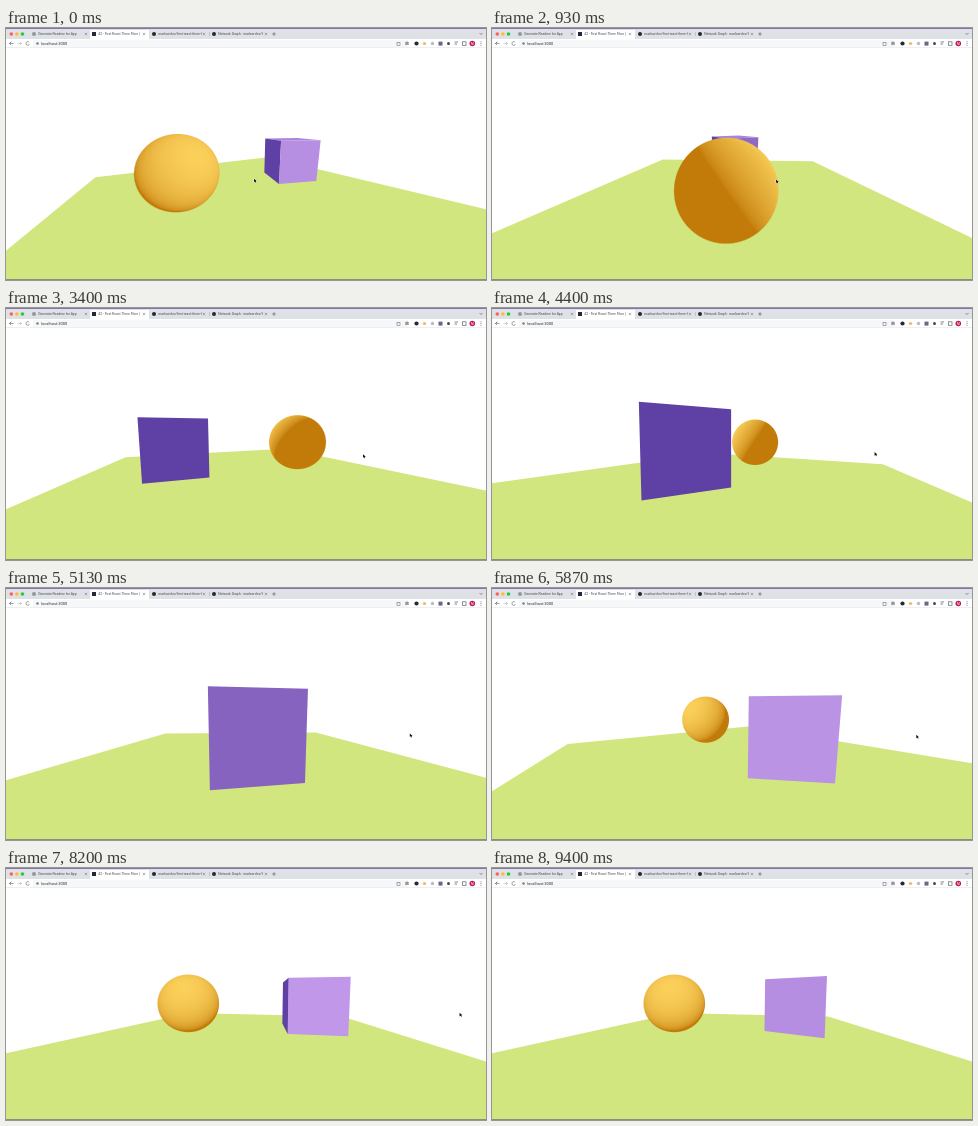
An HTML page with a canvas that plays this animation: 480 px wide and 252 px high, repeating every 9.47 s.

```html
<!DOCTYPE html>
<html lang="en">
<head>
<meta charset="utf-8">
<title>Orbiting scene</title>
<style>
html, body { margin: 0; width: 100%; height: 100%; overflow: hidden; background: #fff; }
canvas { display: block; width: 480px; height: 252px; }
</style>
</head>
<body>
<canvas id="stage" width="480" height="252"></canvas>
<script>
const ctx = document.getElementById('stage').getContext('2d');
const LOOP = 9470, FPS = 15;
const CX = 240, CY = 136, TOP = 20, RAD = Math.PI / 180;
const FOCAL = 116 / Math.tan(37.5 * RAD);
const ORBIT = 5, DEG_PER_PX = 360 / 232;
const LIGHT = [1, 2, 3].map(v => v / Math.sqrt(14));
const BALL = [-2, 0, 0], BOX = [2, 0, 0], HALF = 0.75;
const ORANGE = [[194, 122, 8], [250, 207, 90]];
const PURPLE = [[95, 64, 164], [207, 164, 243]];

// Drag path: seconds, azimuth, elevation
const DRAG = [
  [0, -31, 12.7], [0.933, -87, 14], [2.267, -154, 11], [4.4, -239.8, 2.5],
  [5.867, -304.5, 6.5], [7, -343.5, 3.4], [8.1, -350, 3.5]
];

const dot = (a, b) => a[0] * b[0] + a[1] * b[1] + a[2] * b[2];
const clamp = v => Math.max(0, Math.min(1, v));

function slope(i, c) {
  const rise = j => (DRAG[j + 1][c] - DRAG[j][c]) / (DRAG[j + 1][0] - DRAG[j][0]);
  if (i === 0) return rise(0);
  if (i === DRAG.length - 1) return 0;
  const a = rise(i - 1), b = rise(i);
  return a * b <= 0 ? 0 : 2 * a * b / (a + b);
}

function dragAt(t, c) {
  const last = DRAG.length - 1;
  if (t >= DRAG[last][0]) return DRAG[last][c];
  let i = 0;
  while (t >= DRAG[i + 1][0]) i++;
  const h = DRAG[i + 1][0] - DRAG[i][0], u = (t - DRAG[i][0]) / h, v = 1 - u;
  return DRAG[i][c] * v * v * (1 + 2 * u) + DRAG[i + 1][c] * u * u * (3 - 2 * u)
    + h * u * v * (v * slope(i, c) - u * slope(i + 1, c));
}

function makeCamera(azimuth, elevation) {
  const s = Math.sin(azimuth * RAD), c = Math.cos(azimuth * RAD);
  const se = Math.sin(elevation * RAD), ce = Math.cos(elevation * RAD);
  const back = [ce * s, se, ce * c];
  return { back, right: [c, 0, -s], up: [-se * s, ce, -se * c], eye: back.map(v => v * ORBIT) };
}

const toView = (cam, p) => [dot(cam.right, p), dot(cam.up, p), ORBIT - dot(cam.back, p)];

function shade([dark, lit], amount) {
  const k = Math.pow(Math.max(0, amount), 0.62);
  return dark.map((d, i) => Math.round(d + (lit[i] - d) * k));
}

function clipNear(points, near = 0.1) {
  const out = [];
  points.forEach((a, i) => {
    const b = points[(i + 1) % points.length];
    if (a[2] >= near) out.push(a);
    if ((a[2] >= near) !== (b[2] >= near)) {
      const k = (near - a[2]) / (b[2] - a[2]);
      out.push(a.map((v, j) => v + (b[j] - v) * k));
    }
  });
  return out;
}

function fillFace(cam, points, color) {
  ctx.beginPath();
  for (const [x, y, z] of clipNear(points.map(p => toView(cam, p)))) {
    ctx.lineTo(CX + x / z * FOCAL, CY - y / z * FOCAL);
  }
  ctx.closePath();
  ctx.fillStyle = color;
  ctx.fill();
}

function drawBox(cam, spin) {
  const s = Math.sin(spin), c = Math.cos(spin);
  const place = (x, y, z) => [BOX[0] + x * c + z * s, y, z * c - x * s];
  const face = (normal, corners) => {
    const center = BOX.map((v, i) => v + normal[i] * HALF);
    if (dot(normal, cam.eye) <= dot(normal, center)) return;
    fillFace(cam, corners, `rgb(${shade(PURPLE, dot(normal, LIGHT))})`);
  };
  const ring = [[-HALF, -HALF], [HALF, -HALF], [HALF, HALF], [-HALF, HALF]];
  for (const side of [1, -1]) {
    const d = side * HALF;
    face([0, side, 0], ring.map(([a, b]) => place(a, d, b)));
    face([side * c, 0, -side * s], ring.map(([a, b]) => place(d, a, b)));
    face([side * s, 0, side * c], ring.map(([a, b]) => place(a, b, d)));
  }
}

const ballLayer = document.createElement('canvas');
ballLayer.width = ballLayer.height = 160;
const ballCtx = ballLayer.getContext('2d');

// Ray-traced unit sphere with diffuse light
function drawBall(cam) {
  const size = ballLayer.width, image = ballCtx.createImageData(size, size);
  const [vx, vy, vz] = toView(cam, BALL);
  const left = Math.round(CX + vx / vz * FOCAL - size / 2);
  const top = Math.round(CY - vy / vz * FOCAL - size / 2);
  const toEye = cam.eye.map((v, i) => v - BALL[i]);
  const eyeSq = dot(toEye, toEye);
  for (let y = 0; y < size; y++) {
    for (let x = 0; x < size; x++) {
      const px = (left + x + 0.5 - CX) / FOCAL, py = (CY - top - y - 0.5) / FOCAL;
      const len = Math.hypot(px, py, 1);
      const ray = cam.back.map((b, i) => (cam.right[i] * px + cam.up[i] * py - b) / len);
      const along = dot(ray, toEye), missSq = eyeSq - along * along;
      const cover = clamp((1 - Math.sqrt(missSq)) * FOCAL / vz + 0.5);
      if (!cover) continue;
      const hit = -along - Math.sqrt(Math.max(0, 1 - missSq));
      const normal = toEye.map((v, i) => v + ray[i] * hit);
      image.data.set([...shade(ORANGE, dot(normal, LIGHT)), cover * 255], (y * size + x) * 4);
    }
  }
  ballCtx.putImageData(image, 0, 0);
  ctx.drawImage(ballLayer, left, top);
}

function rect(x, y, w, h, color) {
  ctx.fillStyle = color;
  ctx.fillRect(x, y, w, h);
}

function disc(x, y, r, color) {
  ctx.fillStyle = color;
  ctx.beginPath();
  ctx.arc(x, y, r, 0, 7);
  ctx.fill();
}

function stroke(color, width, ...points) {
  ctx.strokeStyle = color;
  ctx.lineWidth = width;
  ctx.beginPath();
  points.forEach(([x, y]) => ctx.lineTo(x, y));
  ctx.stroke();
}

function label(text, x, y, size, color) {
  ctx.font = `${size}px Roboto, sans-serif`;
  ctx.fillStyle = color;
  ctx.fillText(text, x, y);
}

function cross(x, y) {
  stroke('#666a70', 0.5, [x - 1.2, y - 1.2], [x + 1.2, y + 1.2]);
  stroke('#666a70', 0.5, [x - 1.2, y + 1.2], [x + 1.2, y - 1.2]);
}

function drawBrowser() {
  rect(0, 0, 480, 11, '#dee1e6');
  rect(0, 11, 480, 9, '#fff');
  rect(84, 2, 59, 9, '#fff');
  rect(27, 12, 375, 7, '#f6f7f8');
  rect(0, 0, 480, 1, '#8574ad');
  rect(0, 19.5, 480, 0.5, '#dcdee2');
  ['#fe5f57', '#febc2e', '#28c840'].forEach((color, i) => disc(5.3 + i * 5.6, 6, 1.8, color));

  const tabs = [
    [28, '#8d9a9b', 'Generate Readme for App', 80],
    [88, '#23283c', '42 - First React Three Fiber (', 138],
    [148, '#24292f', 'marlow-dev/first-react-three-f', 198],
    [208, '#24292f', 'Network Graph · marlow-dev/f', 260]
  ];
  for (const [x, color, title, close] of tabs) {
    if (x === 88) rect(x - 2, 4, 4, 4, color);
    else disc(x, 6, 2, color);
    label(title, x + 4.3, 7.3, 3.35, '#45494e');
    cross(close, 6);
  }
  rect(203, 4, 0.5, 4, '#a4a8ad');
  stroke('#555', 0.6, [266.2, 6], [269.8, 6]);
  stroke('#555', 0.6, [268, 4.2], [268, 7.8]);
  stroke('#555', 0.6, [473.5, 5], [475, 6.5], [476.5, 5]);

  stroke('#5f6368', 0.6, [7.5, 15.5], [3.5, 15.5], [5.2, 13.8], [3.5, 15.5], [5.2, 17.2]);
  stroke('#b5b8bc', 0.6, [11.5, 15.5], [15.5, 15.5], [13.8, 13.8], [15.5, 15.5], [13.8, 17.2]);
  ctx.strokeStyle = '#5f6368';
  ctx.beginPath();
  ctx.arc(21.7, 15.5, 1.8, 0.3, 5.6);
  ctx.stroke();
  disc(31.5, 15.5, 1.2, '#777b80');
  label('localhost:3000', 35, 16.9, 4, '#303236');

  ctx.strokeStyle = '#73777c';
  ctx.strokeRect(391, 14.3, 3, 3);
  stroke('#73777c', 0.6, [401, 13.5], [402.4, 17], [399, 14.8], [403, 14.8], [399.6, 17], [401, 13.5]);
  disc(410.5, 15.5, 2.1, '#252a31');
  disc(418.5, 15.5, 1.6, '#e5bd62');
  disc(426.5, 15.5, 1.7, '#b9bbc0');
  rect(432.5, 13.6, 4, 4, '#686b87');
  disc(442.5, 15.5, 1.5, '#454950');
  stroke('#555', 0.7, [448.5, 14], [452, 14]);
  stroke('#555', 0.7, [448.5, 16], [451, 16]);
  ctx.strokeStyle = '#5f6368';
  ctx.strokeRect(456.5, 13.8, 3.5, 3.5);
  disc(466.3, 15.5, 2.8, '#c2185b');
  label('M', 464.9, 16.7, 3.2, '#fff');
  [13.8, 15.5, 17.2].forEach(y => disc(475, y, 0.5, '#5f6368'));
}

function drawPointer(x, y) {
  ctx.beginPath();
  [[0, 0], [0, 3.6], [0.9, 2.9], [1.6, 4.1], [2.2, 3.8], [1.7, 2.6], [2.8, 2.5]]
    .forEach(([dx, dy]) => ctx.lineTo(x + dx, y + dy));
  ctx.closePath();
  ctx.strokeStyle = '#fff';
  ctx.lineWidth = 0.7;
  ctx.stroke();
  ctx.fillStyle = '#111';
  ctx.fill();
}

function draw(t) {
  const azimuth = dragAt(t, 1), elevation = dragAt(t, 2);
  const cam = makeCamera(azimuth, elevation);
  rect(0, 0, 480, 252, '#fff');

  ctx.save();
  ctx.beginPath();
  ctx.rect(0, TOP, 480, 232);
  ctx.clip();
  fillFace(cam, [[-5, -1, -5], [5, -1, -5], [5, -1, 5], [-5, -1, 5]], '#d1e67e');
  const spin = t - 198 * RAD;
  if (dot(cam.back, BALL) > 0) {
    drawBox(cam, spin);
    drawBall(cam);
  } else {
    drawBall(cam);
    drawBox(cam, spin);
  }
  ctx.restore();

  drawBrowser();
  rect(0, 251.3, 480, 0.7, '#6f6a80');
  const exit = clamp((t - 8.5) / 0.65), ease = exit * exit * (3 - 2 * exit);
  const x = 248 + (-31 - azimuth) / DEG_PER_PX - 80 * ease;
  const y = 142.5 + elevation / DEG_PER_PX - 152 * ease;
  drawPointer(x, y);
}

function tick(now) {
  const step = Math.floor((now % LOOP) * FPS / 1000 + 0.06);
  draw(Math.min(step, 141) / FPS);
  requestAnimationFrame(tick);
}
requestAnimationFrame(tick);
</script>
</body>
</html>
```
